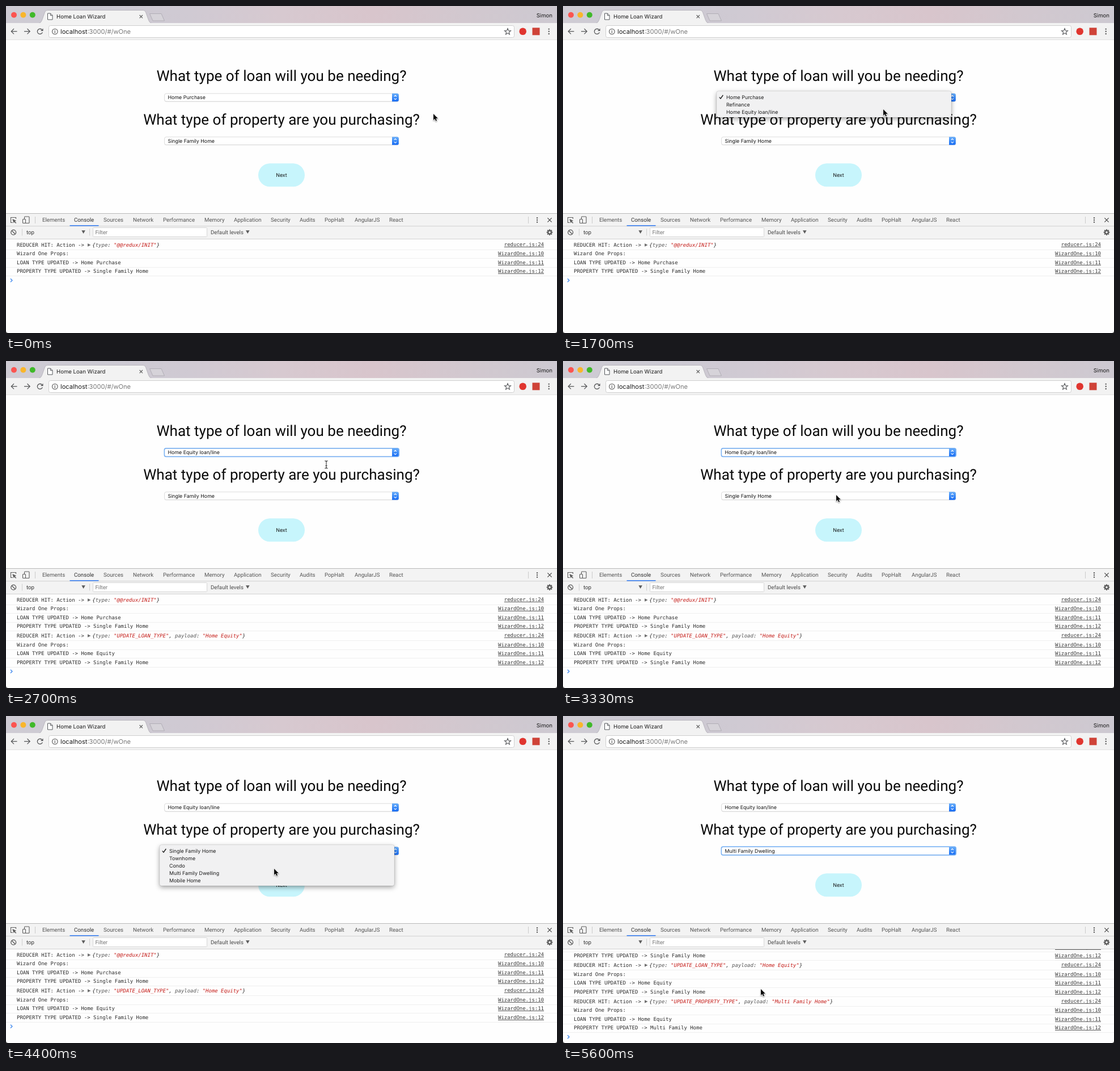
Write an HTML page with a canvas that moves like this. It is 972 px wide and 576 px high and loops after 6.9 s.

```html
<!DOCTYPE html>
<html lang="en">
<head>
<meta charset="utf-8">
<title>Home Loan Wizard</title>
<style>
html, body { margin: 0; width: 100%; height: 100%; overflow: hidden; background: #fefefe; }
canvas { display: block; }
</style>
</head>
<body>
<canvas id="stage" width="972" height="576"></canvas>
<script>
const W = 972, H = 576, LOOP = 6900;
const screen2d = document.getElementById('stage').getContext('2d');
const layer = document.createElement('canvas');
layer.width = W;
layer.height = H;
const layer2d = layer.getContext('2d');
let ctx = screen2d;

const UI = 'Inter, "Open Sans", sans-serif';
const TOOLS = '9.7px Roboto, sans-serif';
const MONO = '8.97px "DejaVu Sans Mono", monospace';
const CHAR = 5.4;
const FIELD = '8.85px ' + UI;

// ---- drawing helpers ----
function text(s, x, y, font, color, align = 'left') {
  ctx.font = font;
  ctx.fillStyle = color;
  ctx.textAlign = align;
  ctx.fillText(s, x, y);
}

function rect(x, y, w, h, color) {
  ctx.fillStyle = color;
  ctx.fillRect(x, y, w, h);
}

function box(x, y, w, h, r, fill, stroke, lw = 1) {
  ctx.beginPath();
  ctx.roundRect(x, y, w, h, r);
  paint(fill, stroke, lw);
}

function disc(x, y, r, fill, stroke, lw = 1) {
  ctx.beginPath();
  ctx.arc(x, y, r, 0, Math.PI * 2);
  paint(fill, stroke, lw);
}

function poly(points, fill, stroke, lw = 1, close = true) {
  ctx.beginPath();
  points.forEach(([x, y]) => ctx.lineTo(x, y));
  if (close) ctx.closePath();
  paint(fill, stroke, lw);
}

const line = (points, color, lw = 1) => poly(points, null, color, lw, false);

function paint(fill, stroke, lw) {
  if (fill) { ctx.fillStyle = fill; ctx.fill(); }
  if (stroke) { ctx.strokeStyle = stroke; ctx.lineWidth = lw; ctx.stroke(); }
}

function gradient(x0, y0, x1, y1, colors) {
  const g = ctx.createLinearGradient(x0, y0, x1, y1);
  colors.forEach((c, i) => g.addColorStop(i / (colors.length - 1), c));
  return g;
}

function cross(x, y, r, color, lw) {
  line([[x - r, y - r], [x + r, y + r]], color, lw);
  line([[x - r, y + r], [x + r, y - r]], color, lw);
}

function dots(x, y, step, color) {
  for (let i = -1; i < 2; i++) disc(x, y + i * step, 1.2, color);
}

const caret = (x, y, color) =>
  poly([[x - 3.3, y - 2.8], [x + 3.3, y - 2.8], [x, y + 3]], color);

// ---- browser window ----
function tabStrip() {
  rect(0, 0, W, 30, gradient(0, 0, W, 0,
    ['#cfccd4', '#cbc9d2', '#d0cad3', '#d7c9d0', '#d8c5cc', '#d2c8cf', '#cdc9d1']));
  ['#fb5450', '#f9b62b', '#3fb929'].forEach((c, i) => disc(14 + i * 16.4, 15.7, 5, c));
  ctx.beginPath();
  ctx.moveTo(58, 30.5);
  ctx.quadraticCurveTo(62, 29.5, 63.5, 25);
  ctx.lineTo(68.5, 11);
  ctx.quadraticCurveTo(69.7, 7.5, 73, 7.5);
  ctx.lineTo(242, 7.5);
  ctx.quadraticCurveTo(245.3, 7.5, 246.5, 11);
  ctx.lineTo(251.5, 25);
  ctx.quadraticCurveTo(253, 29.5, 257, 30.5);
  paint('#f2f2f2', '#b1aeb6', 0.8);
  poly([[253.5, 13.5], [274, 13.5], [279.5, 26], [259, 26]], '#d6d3d9', '#aeabb3', 0.9);
  poly([[73.5, 13], [78.5, 13], [82, 16.5], [82, 24], [73.5, 24]], '#fff', '#55585c', 1);
  line([[78.3, 13], [78.3, 16.7], [82, 16.7]], '#55585c', 1);
  text('Home Loan Wizard', 89, 22, '9.6px ' + UI, '#1c1c1c');
  cross(238.3, 18.7, 2.7, '#5c5c5c', 1.1);
  text('Simon', 964, 20, '9.6px ' + UI, '#1c1c1c', 'right');
}

function toolbar() {
  rect(0, 30, W, 30, '#f2f2f2');
  rect(0, 59.5, W, 1, '#d4d4d4');
  const ink = '#58595b';
  line([[19.5, 44.7], [9.5, 44.7]], ink, 1.3);
  line([[14, 40], [9.3, 44.7], [14, 49.4]], ink, 1.3);
  line([[32, 44.7], [42, 44.7]], ink, 1.3);
  line([[37.5, 40], [42.2, 44.7], [37.5, 49.4]], ink, 1.3);
  ctx.beginPath();
  ctx.arc(60, 44.8, 4.6, 0.35, Math.PI * 1.75);
  paint(null, ink, 1.4);
  poly([[65.5, 39.5], [65.5, 44], [61, 44]], ink);

  box(75.5, 34.5, 821, 21, 3, '#fff', '#cfcfcf');
  disc(86.3, 45, 4.8, null, '#5a5a5a', 1.1);
  rect(85.7, 44.3, 1.3, 3.4, '#5a5a5a');
  rect(85.7, 42.2, 1.3, 1.3, '#5a5a5a');
  const font = '11.1px ' + UI;
  text('localhost', 96, 49, font, '#1b1b1b');
  const host = ctx.measureText('localhost').width;
  text(':3000/#/wOne', 96 + host, 49, font, '#777');

  const star = [];
  for (let i = 0; i < 10; i++) {
    const a = -Math.PI / 2 + i * Math.PI / 5, r = i % 2 ? 2.5 : 5.8;
    star.push([885 + r * Math.cos(a), 45.3 + r * Math.sin(a)]);
  }
  poly(star, null, '#56585b', 1.1);
  disc(911.7, 44.7, 6.3, '#e0352f');
  rect(928.5, 38.3, 13, 13, '#cf4338');
  dots(957.7, 44.8, 4.2, '#5a5a5a');
}

function select(label, y, focused) {
  box(279.5, y + 0.8, 413.5, 14, 3, '#dedede');
  box(279.7, y + 0.2, 413, 13.8, 3, '#fff', '#d3d3d3', 0.8);
  box(681, y, 11.8, 14.2, [0, 3, 3, 0],
    gradient(0, y, 0, y + 14, ['#6cb0fa', '#3b8bf7', '#1a6df3']));
  line([[684.6, y + 5.6], [686.8, y + 3.4], [689, y + 5.6]], '#fff', 1.1);
  line([[684.6, y + 8.6], [686.8, y + 10.8], [689, y + 8.6]], '#fff', 1.1);
  if (focused) box(279.3, y - 0.2, 414, 14.7, 3, null, '#72aef5', 1.4);
  text(label, 285.5, y + 10.3, FIELD, '#111');
}

function page(loan, property, focus) {
  rect(0, 60, W, 306, '#fefefe');
  const font = '26.05px Roboto, sans-serif';
  text('What type of loan will you be needing?', 486, 132, font, '#0a0a0a', 'center');
  text('What type of property are you purchasing?', 486, 208.5, font, '#0a0a0a', 'center');
  select(loan, 154, focus === 1);
  select(property, 230.5, focus === 2);
  box(445, 277.3, 82, 41, 20.5, '#c7f5fc');
  text('Next', 486, 301.3, FIELD, '#111', 'center');
}

// ---- developer tools ----
const TABS = [['Elements', 64], ['Console', 120], ['Sources', 172], ['Network', 224],
  ['Performance', 277], ['Memory', 350], ['Application', 402], ['Security', 467],
  ['Audits', 518], ['PopHalt', 562], ['AngularJS', 615], ['React', 676]];

function toolsHeader() {
  rect(0, 365, W, 46, '#f3f3f3');
  rect(0, 365, W, 1, '#b9b9b9');
  rect(0, 387.3, W, 1, '#cfcfcf');
  rect(0, 410, W, 1, '#d2d2d2');
  const ink = '#5d5d5d';
  line([[12, 381.5], [8.5, 381.5], [8.5, 372.5], [17.5, 372.5], [17.5, 375]], ink, 1.1);
  poly([[11.3, 375], [18.3, 378.2], [15.6, 379.3], [18.3, 382], [17.2, 383], [14.6, 380.4], [13.5, 382.6]], ink);
  box(32.5, 371, 8.5, 11.5, 1, null, ink, 1.1);
  box(29.5, 375.5, 5, 7, 1, '#f3f3f3', ink, 1.1);
  [51, 921].forEach(x => rect(x, 371, 1, 12, '#cbcbcb'));
  TABS.forEach(([s, x]) => text(s, x, 380.3, TOOLS, s === 'Console' ? '#2e2e2e' : '#555'));
  rect(112.5, 386, 51, 1.7, '#4586f0');
  dots(937, 377, 3.7, ink);
  cross(959, 377, 3.6, '#4c4c4c', 1.3);

  disc(13.2, 398.7, 4.4, null, '#555', 1.3);
  line([[10.2, 395.7], [16.2, 401.7]], '#555', 1.3);
  [28, 147].forEach(x => rect(x, 392.5, 1, 12, '#cfcfcf'));
  text('top', 36, 401.8, TOOLS, '#333');
  caret(136.6, 398, '#5c5c5c');
  box(153.5, 390.5, 201, 16, 1, '#fff', '#d5d5d5');
  text('Filter', 157.5, 401.8, TOOLS, '#777');
  text('Default levels', 361, 401.8, TOOLS, '#4b4b4b');
  caret(426.3, 398, '#5c5c5c');
  for (let i = 0; i < 8; i++) {
    const a = i * Math.PI / 4, c = Math.cos(a), s = Math.sin(a);
    line([[959 + 3 * c, 398.6 + 3 * s], [959 + 5.4 * c, 398.6 + 5.4 * s]], ink, 2);
  }
  disc(959, 398.6, 2.9, null, ink, 2.2);
}

function actionPreview(type, payload, y) {
  text('REDUCER HIT: Action ->', 19, y, MONO, '#2b2b2b');
  poly([[144, y - 5.8], [144, y - 0.2], [149.5, y - 3]], '#6e6e6e');
  let x = 152.3;
  const put = (s, color) => {
    text(s, x, y, 'italic ' + MONO, color);
    x += s.length * CHAR;
  };
  put('{', '#2b2b2b');
  put('type', '#565656');
  put(': ', '#2b2b2b');
  put(`"${type}"`, '#c41a16');
  if (payload) {
    put(', ', '#2b2b2b');
    put('payload', '#565656');
    put(': ', '#2b2b2b');
    put(`"${payload}"`, '#c41a16');
  }
  put('}', '#2b2b2b');
}

function link(s, y) {
  text(s, 949, y, MONO, '#3a3a3a', 'right');
  rect(949 - s.length * CHAR, y + 1, s.length * CHAR, 0.9, '#4a4a4a');
}

// One entry per dispatched action: type, payload, loan, property.
const LOG = [
  ['@@redux/INIT', '', 'Home Purchase', 'Single Family Home'],
  ['UPDATE_LOAN_TYPE', 'Home Equity', 'Home Equity', 'Single Family Home'],
  ['UPDATE_PROPERTY_TYPE', 'Multi Family Home', 'Home Equity', 'Multi Family Home']
];

function consoleLog(count, barAlpha) {
  rect(0, 411, W, 165, '#fefefe');
  ctx.save();
  ctx.beginPath();
  ctx.rect(0, 411, W, 165);
  ctx.clip();
  let y = count === 3 ? 366.8 : 411.8;
  const nextRow = h => {
    y += h;
    rect(0, Math.round(y), W, 1, '#efefef');
    return Math.round(y - 5.3);
  };
  LOG.slice(0, count).forEach(([type, payload, loan, property]) => {
    const base = nextRow(17);
    actionPreview(type, payload, base);
    link('reducer.js:24', base - 1);
    ['Wizard One Props:', 'LOAN TYPE UPDATED -> ' + loan, 'PROPERTY TYPE UPDATED -> ' + property]
      .forEach((s, i) => {
        const b = nextRow(15.5);
        text(s, 19, b, MONO, '#2b2b2b');
        link('WizardOne.js:1' + i, b);
      });
  });
  line([[8, y + 5], [11, y + 8], [8, y + 11]], '#3b86ee', 1.3);
  ctx.restore();
  if (barAlpha > 0) box(965.5, 447, 5, 127, 2.5, `rgba(0,0,0,${0.5 * barAlpha})`);
}

// ---- popup menus ----
const MENUS = [
  { at: 1000, click: 1700, top: 153,
    items: ['Home Purchase', 'Refinance', 'Home Equity loan/line'] },
  { at: 3400, click: 4400, top: 230,
    items: ['Single Family Home', 'Townhome', 'Condo', 'Multi Family Dwelling', 'Mobile Home'] }
];
const BLINK = 60, FADE_AT = 130, FADE = 170, LOGGED = 360;

function menu({ at, click, top, items }, t, y) {
  const since = t - click;
  const alpha = 1 - Math.min(1, Math.max(0, (since - FADE_AT) / FADE));
  if (t < at || alpha <= 0) return;
  const lit = since >= 0 && since < BLINK ? -1 : Math.floor((y - top) / 13);
  ctx = layer2d;
  ctx.clearRect(0, 0, W, H);
  ctx.save();
  ctx.shadowColor = 'rgba(0,0,0,.36)';
  ctx.shadowBlur = 9;
  ctx.shadowOffsetY = 3;
  box(271, top - 3, 414, items.length * 13 + 7, 3.5, '#f1f1f2');
  ctx.restore();
  box(270.8, top - 3.2, 414.4, items.length * 13 + 7.4, 3.5, null, 'rgba(0,0,0,.17)', 0.6);
  items.forEach((s, i) => {
    const row = top + i * 13, color = i === lit ? '#fff' : '#1a1a1a';
    if (i === lit) rect(271, row + 0.5, 414, 13, '#4c95fd');
    text(s, 288, row + 10.6, FIELD, color);
    if (i === 0) line([[275.8, row + 7.6], [278, row + 10.2], [282.3, row + 4]], color, 1.4);
  });
  ctx = screen2d;
  ctx.globalAlpha = alpha;
  ctx.drawImage(layer, 0, 0);
  ctx.globalAlpha = 1;
}

// ---- pointer ----
// Moves: start, end, x, y.
const MOVES = [[30, 660, 594, 164], [1000, 1160, 565, 182], [2700, 3330, 482, 236],
  [3560, 3900, 480, 258], [3900, 4160, 473, 269], [4700, 5000, 349, 481]];

function pointerAt(t) {
  let x = 754, y = 190;
  for (const [from, to, nx, ny] of MOVES) {
    if (t <= from) break;
    const p = Math.min(1, (t - from) / (to - from)), e = p * p * (3 - 2 * p);
    x += (nx - x) * e;
    y += (ny - y) * e;
  }
  return [x, y];
}

function pointer(x, y, overText) {
  ctx.save();
  ctx.translate(x, y);
  ctx.lineJoin = 'round';
  if (overText) {
    const stem = [[0, -5], [0, 6]];
    const ends = [[[-2.8, -6], [-1, -6], [0, -5], [1, -6], [2.8, -6]],
      [[-2.8, 7], [-1, 7], [0, 6], [1, 7], [2.8, 7]]];
    [stem, ...ends].forEach(s => line(s, '#333', 1.1));
    line([[-1.6, 2.5], [1.6, 2.5]], '#333', 1);
  } else {
    ctx.shadowColor = 'rgba(0,0,0,.35)';
    ctx.shadowBlur = 2;
    ctx.shadowOffsetY = 1;
    const arrow = [[0, 0], [0, 11], [2.5, 8.7], [4.2, 12.6], [6.1, 11.8], [4.4, 8], [7.9, 8]];
    poly(arrow, '#fff', '#fff', 1.7);
    ctx.shadowColor = 'transparent';
    poly(arrow, '#0b0b0b');
  }
  ctx.restore();
}

function corners() {
  poly([[0, 572.5], [0.8, 575.2], [3.5, 576], [0, 576]], '#222');
  poly([[W, 572.5], [W - 0.8, 575.2], [W - 3.5, 576], [W, 576]], '#222');
}

function draw(t) {
  const [x, y] = pointerAt(t);
  const [first, second] = MENUS;
  const chosen = m => t >= m.click + FADE_AT + FADE;
  const fading = m => t >= m.click + FADE_AT;
  const logged = m => t >= m.click + LOGGED;
  const focus = fading(second) ? 2 : fading(first) && t < second.at ? 1 : 0;

  tabStrip();
  toolbar();
  page(first.items[chosen(first) ? 2 : 0], second.items[chosen(second) ? 3 : 0], focus);
  toolsHeader();
  const bar = logged(second) ? 1 - Math.min(1, Math.max(0, (t - 5400) / 200)) : 0;
  consoleLog(1 + logged(first) + logged(second), bar);
  MENUS.forEach(m => menu(m, t, y));
  corners();
  const open = MENUS.some(m => t >= m.at && t < m.click + 400);
  pointer(x, y, !open && x > 242 && x < 730 && y > 181 && y < 215);
}

[screen2d, layer2d].forEach(c => { c.textRendering = 'geometricPrecision'; });
const begin = performance.now();
function tick() {
  draw((performance.now() - begin) % LOOP);
  requestAnimationFrame(tick);
}
tick();
</script>
</body>
</html>
```
